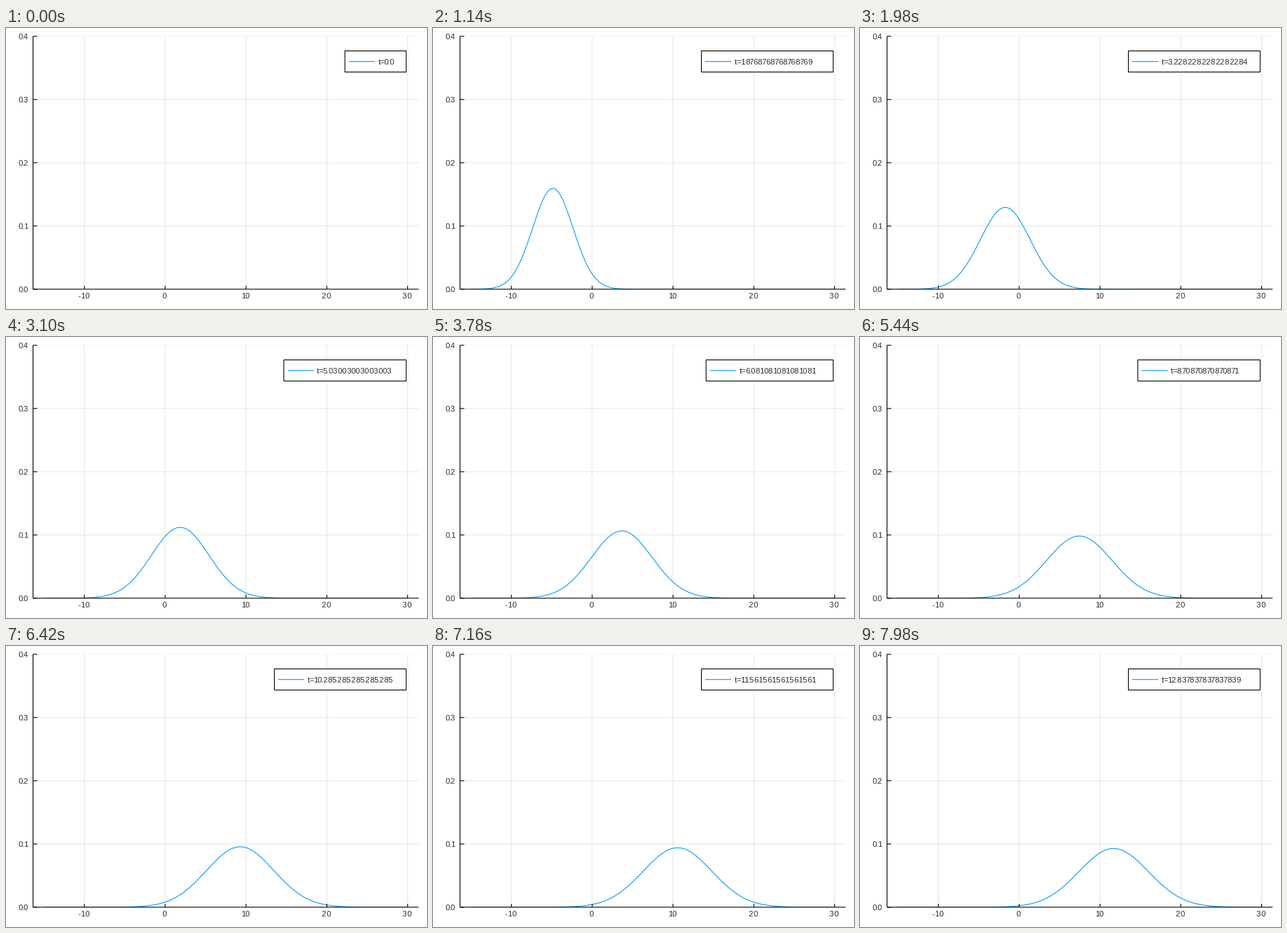
These frames come from a looping animation (600x400 px, 8000 ms). A matplotlib script:

```python
import numpy as np
import matplotlib.pyplot as plt
from matplotlib.animation import FuncAnimation
from matplotlib.patches import Rectangle

W, H, DPI = 600, 400, 100
PX = 72 / DPI                      # one pixel in points
FONT = 11.2                        # text size in pixels
INK, BLUE = "#2b2b2b", "#009AFA"
LEFT, RIGHT, TOP, BASE = 38.5, 588.0, 11.8, 371.8
X_MIN, X_MAX, Y_MAX = -16.35, 31.35, 0.4

# Ornstein-Uhlenbeck process: start, long-run mean, rate, noise
START, MEAN, RATE, NOISE = -10, 20, 0.1, 2

# Loosely spaced advances and pair tightening, in ems
ADVANCE = {".": 0.298, "t": 0.298, "=": 0.625, "-": 0.357}
TIGHT = {".": 0.09, "=": 0.09, "7": 0.096, "1": 0.048, "0": 0.016}

plt.rcParams["font.family"] = "Liberation Sans"
fig = plt.figure(figsize=(W / DPI, H / DPI), dpi=DPI, facecolor="white")
ax = fig.add_axes([0, 0, 1, 1])
ax.set_axis_off()
ax.set(xlim=(0, W), ylim=(H, 0), autoscale_on=False)


def to_x(x):
    return LEFT + (x - X_MIN) / (X_MAX - X_MIN) * (RIGHT - LEFT)


def to_y(y):
    return BASE - y / Y_MAX * (BASE - TOP)


def layout(text):
    """Offset of every character, and the width of the whole string."""
    offsets, pos = [], 0.0
    for i, ch in enumerate(text):
        if i:
            pos -= FONT * sum(TIGHT.get(c, 0) for c in text[i - 1:i + 1])
        offsets.append(pos)
        pos += FONT * ADVANCE.get(ch, 0.595)
    return offsets, pos


def glyph(x, y, ch):
    return ax.text(x, y, ch, size=FONT * PX, color=INK, va="baseline", zorder=6)


def label(text, x, y, align):
    offsets, width = layout(text)
    for ch, dx in zip(text, offsets):
        glyph(x - align * width + dx, y + 4.2, ch)


def density(x, t):
    mean = MEAN + (START - MEAN) * np.exp(-RATE * t)
    var = NOISE**2 / (2 * RATE) * (1 - np.exp(-2 * RATE * t))
    return np.exp(-(x - mean) ** 2 / (2 * var)) / np.sqrt(2 * np.pi * var)


# Grid, axes and ticks
x_ticks = np.arange(-10, 31, 10)
y_ticks = np.arange(5) / 10
tx, ty = to_x(x_ticks), to_y(y_ticks)
grid = dict(colors="black", linewidths=PX, snap=False, zorder=1)
ax.vlines(tx, TOP, BASE, alpha=0.1, **grid)
ax.hlines(ty[1:-1], LEFT, RIGHT, alpha=0.1, **grid)
ax.hlines(ty[-1:], LEFT, RIGHT, alpha=0.05, **grid)

axes_style = dict(colors="black", linewidths=1.1 * PX, snap=False, zorder=4)
ax.vlines([LEFT], TOP, BASE, **axes_style)
ax.hlines([BASE], LEFT, RIGHT, **axes_style)
ax.vlines(tx, 367, BASE, **axes_style)
ax.hlines(ty, LEFT, 44.5, **axes_style)

for value, x in zip(x_ticks, tx):
    label(str(value), x - 1, 381, 0.5)
for value, y in zip(y_ticks, ty):
    label(f"{value:.1f}", 31.5, y, 1)

# Curve and legend
xs = np.linspace(-15, 30, 901)
curve, = ax.plot([], [], color=BLUE, lw=1.1 * PX, snap=False, zorder=3)
window = Rectangle((LEFT, TOP), RIGHT - LEFT, BASE - TOP, transform=ax.transData)
curve.set_clip_path(window)

box = Rectangle((483, 32.6), 87.3, 30.1, fc="white", ec="black",
                lw=1.1 * PX, snap=False, zorder=5)
ax.add_patch(box)
key, = ax.plot([], [], color=BLUE, lw=1.1 * PX, snap=False, zorder=6)
letters = [glyph(0, 52.2, "") for _ in range(24)]


def set_legend(text):
    left = 483 - 6.7 * (len(text) - 5)
    box.set_x(left)
    box.set_width(570.3 - left)
    key.set_data([left + 6, left + 42], [47.7, 47.7])
    offsets, _ = layout(text)
    for i, letter in enumerate(letters):
        shown = i < len(text)
        letter.set_text(text[i] if shown else "")
        if shown:
            letter.set_x(left + 47.4 + offsets[i])


def step_at(tick):
    """Steps last 1, 5 and 1 ticks in turn."""
    turn, rest = divmod(tick, 7)
    return 3 * turn + (rest > 0) + (rest > 5)


def draw(tick):
    t = 75 * step_at(tick) / 999
    if t > 0:
        curve.set_data(to_x(xs), to_y(density(xs, t)))
    else:
        curve.set_data([], [])
    set_legend(f"t={t}")
    return [curve, box, key, *letters]


anim = FuncAnimation(fig, draw, frames=400, interval=20, repeat=True,
                     repeat_delay=0, blit=False)
plt.show()
```
